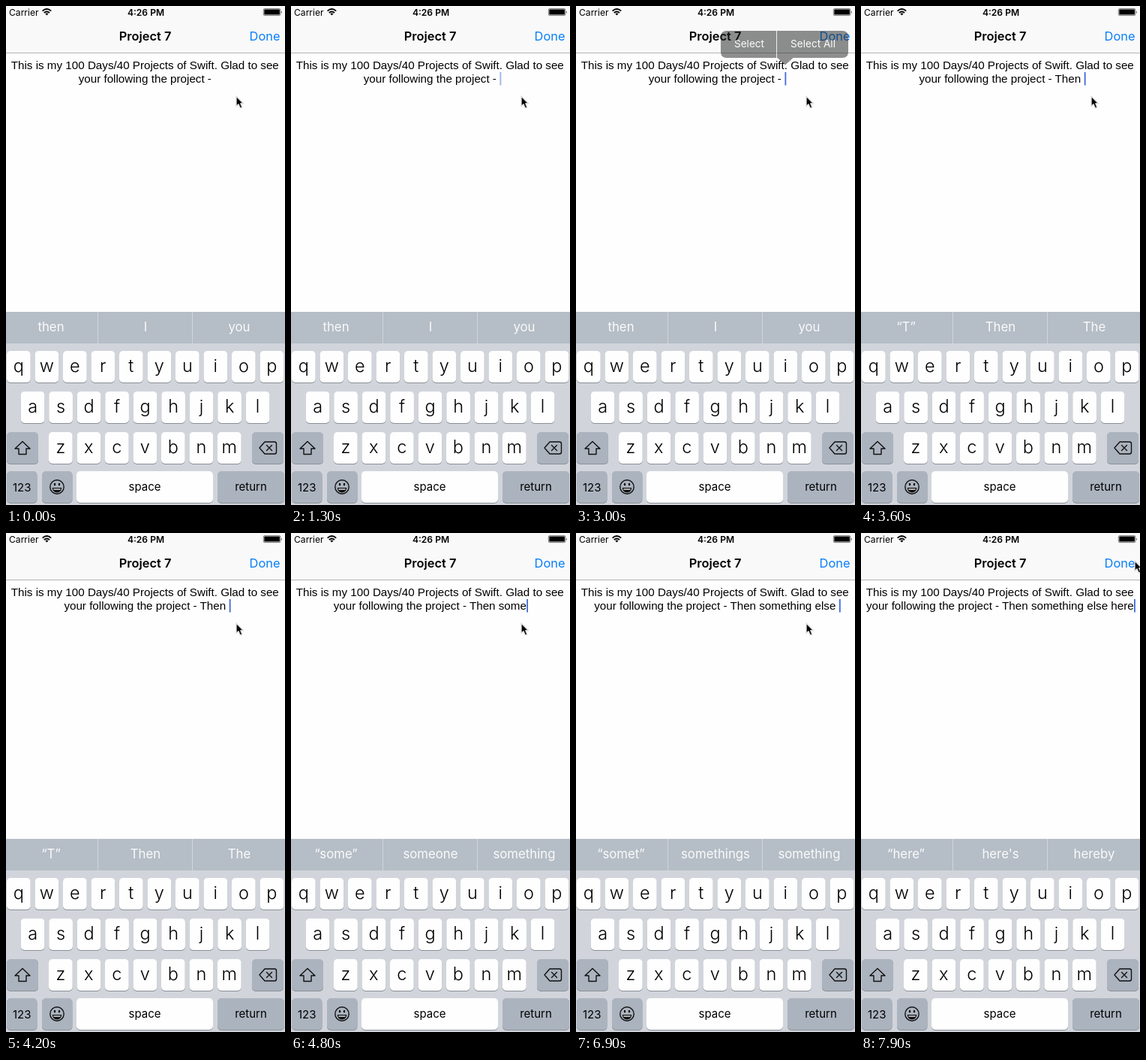
An HTML page for the animation above (8 s loop, 372 by 664 pixels).

```html
<!DOCTYPE html>
<html lang="en">
<head>
<meta charset="utf-8">
<title>Text editor</title>
<style>
  html, body { margin: 0; width: 100%; height: 100%; overflow: hidden; background: #fefefe; }
  svg { display: block; width: 100%; height: 100%; }
  text { font-family: Inter, Roboto, sans-serif; text-anchor: middle; }
  .note { font: 15.2px "Liberation Sans", Arial, sans-serif; }
  .nav { font-size: 16.4px; }
  .status { font-size: 12.1px; }
  .word { font-size: 16.8px; fill: #fff; fill-opacity: .93; }
  .letter { font-size: 23.5px; font-weight: 350; }
  .label { font-size: 15px; }
  .menu { font-size: 13.6px; fill: #fff; }
  .line { fill: none; stroke: #111; stroke-width: 1.4; stroke-linejoin: round; stroke-linecap: round; }
</style>
</head>
<body>
<svg viewBox="0 0 372 664">
  <rect width="372" height="664" fill="#fefefe"/>
  <rect width="372" height="62" fill="#f9f9f9"/>
  <rect y="62" width="372" height="1" fill="#b4b4b4"/>

  <text class="status" x="4" y="12.5" style="text-anchor:start">Carrier</text>
  <g fill="none" stroke="#000" stroke-width="1.9">
    <path d="M48.6 6.6Q54.4 1.6 60.2 6.6M50.8 9Q54.4 5.8 58 9"/>
    <path d="M52.3 10.3Q54.4 8.6 56.5 10.3L54.4 12.6Z" fill="#000" stroke="none"/>
  </g>
  <text class="status" x="186.5" y="12.5" font-weight="600">4:26 PM</text>
  <rect x="343.3" y="3.6" width="22.6" height="9" rx="1.5" fill="none" stroke="#000" stroke-width=".5"/>
  <rect x="344.3" y="4.6" width="20.6" height="7" rx=".5"/>
  <path d="M366.8 6.5q1.8 1.7 0 3.5z"/>

  <text class="nav" x="185.6" y="46" font-weight="600">Project 7</text>
  <text class="nav" x="345" y="46" fill="#087ffb">Done</text>

  <text class="note" x="185.3" y="84">This is my 100 Days/40 Projects of Swift. Glad to see</text>
  <text class="note" id="typed" x="185.3" y="102"></text>
  <rect id="caret" y="88" width="1.8" height="17.5" fill="#4169d8"/>

  <g id="menu">
    <path d="M201 33H355Q363 33 363 41V61Q363 69 355 69H289.5L279 78.5L268.5 69H201Q193 69 193 61V41Q193 33 201 33Z" fill="#202122"/>
    <rect x="267" y="33" width="1" height="36" fill="#e4e4e4"/>
    <text class="menu" x="231" y="55.2">Select</text>
    <text class="menu" x="316" y="55.2">Select All</text>
  </g>

  <rect y="407" width="372" height="257" fill="#d1d5db"/>
  <rect y="407" width="372" height="42" fill="#b5bdc6"/>
  <path d="M122.5 407V449M248.5 407V449" stroke="#d0d5db"/>
  <g id="words"></g>
  <g id="keys"></g>

  <path class="line" d="M22 579.5L32 589H27V596.5H17V589H12Z"/>
  <path class="line" d="M345 580H358Q360.5 580 360.5 582.5V593.5Q360.5 596 358 596H345L338 588ZM347.5 584.5L354.5 591.5M354.5 584.5L347.5 591.5"/>
  <g>
    <circle class="line" cx="68" cy="640" r="9.2"/>
    <path d="M61.7 641H74.3Q73.6 647.4 68 647.4Q62.4 647.4 61.7 641Z" fill="#111"/>
    <path d="M63.2 642.2H72.8L72.4 643.8H63.6Z" fill="#dfe3e8"/>
    <ellipse cx="65" cy="636.6" rx="1.2" ry="1.8"/>
    <ellipse cx="71" cy="636.6" rx="1.2" ry="1.8"/>
  </g>

  <path id="pointer" d="M0 0V13.5L3 10.8L5.3 16L8 14.9L5.8 9.8H9.6Z" stroke="#ddd" stroke-width="1.4" stroke-linejoin="round"/>
</svg>

<script>
const LOOP = 8000, STEP = 100, CENTER = 185.3, SPACE = 4.22;
const START = 'your following the project - ';
const ADDED = 'Then something else here';
const byId = id => document.getElementById(id);
const typed = byId('typed'), caret = byId('caret'), menu = byId('menu'), pointer = byId('pointer');
const clamp = v => Math.max(0, Math.min(1, v));
const ramp = (t, a, b) => clamp((t - a) / (b - a));

function add(parent, tag, attrs, content = '') {
  const el = document.createElementNS('http://www.w3.org/2000/svg', tag);
  for (const name in attrs) el.setAttribute(name, attrs[name]);
  el.textContent = content;
  return parent.appendChild(el);
}

function addKey(x, y, w, fill, cls, content, baseline) {
  const box = { x, width: w, height: 42, rx: 5 };
  add(byId('keys'), 'rect', { ...box, y: y + 1, fill: '#8a8f97' });
  add(byId('keys'), 'rect', { ...box, y, fill });
  if (content) add(byId('keys'), 'text', { class: cls, x: x + w / 2, y: y + baseline }, content);
}

const GREY = '#abb3be', WHITE = '#fefefe';
[['qwertyuiop', 1], ['asdfghjkl', 19.75], ['zxcvbnm', 57]].forEach(([row, x], i) =>
  [...row].forEach((ch, k) => addKey(x + k * 37.5, 459 + i * 54, 31.7, WHITE, 'letter', ch, 27.5)));
addKey(1, 567, 42, GREY);
addKey(328, 567, 42, GREY);
addKey(1, 619, 40.5, GREY, 'label', '123', 26.5);
addKey(48, 619, 40.5, GREY);
addKey(94, 619, 182, WHITE, 'label', 'space', 26);
addKey(282, 619, 89, GREY, 'label', 'return', 26);

const words = [60, 186, 311].map(x => add(byId('words'), 'text', { class: 'word', x, y: 433 }));

// Bursts of typing: first key time, number of keys, one key per step
const bursts = [[3100, 4], [3600, 1], [4500, 4], [5600, 6], [6500, 6], [7200, 3]];
const hints = [
  [0, 'then', 'I', 'you'],
  [3200, '“T”', 'Then', 'The'],
  [4800, '“some”', 'someone', 'something'],
  [5700, '“somet”', 'somethings', 'something'],
  [7600, '“here”', 'here\'s', 'hereby']
];

const keyCount = t => bursts.reduce((sum, [from, n]) =>
  sum + Math.max(0, Math.min(n, Math.floor((t - from) / STEP) + 1)), 0);

function blink(t) {
  if (t >= 3000) return 1;
  const p = t % 800;
  return ramp(p, 50, 250) * (1 - ramp(p, 400, 600));
}

function draw(time) {
  const t = Math.floor(time % LOOP / STEP) * STEP;
  const line = START + ADDED.slice(0, keyCount(t));
  const shown = line.trimEnd();
  typed.textContent = shown;
  const end = CENTER + typed.getComputedTextLength() / 2 + (line.length - shown.length) * SPACE;
  caret.setAttribute('x', end + 0.3);
  caret.setAttribute('opacity', blink(t));

  menu.setAttribute('opacity', ramp(t, 1600, 1800) * (1 - ramp(t, 2900, 3100)));

  const hint = hints.filter(h => h[0] <= t).pop();
  words.forEach((el, i) => { el.textContent = hint[i + 1]; });

  const p = ramp(t, 7500, 7900), move = p * p * (3 - 2 * p);
  pointer.setAttribute('transform', `translate(${307 + 58 * move} ${120 - 83 * move})`);
}

const began = performance.now();
function tick() {
  draw(performance.now() - began);
  requestAnimationFrame(tick);
}
tick();
</script>
</body>
</html>
```
